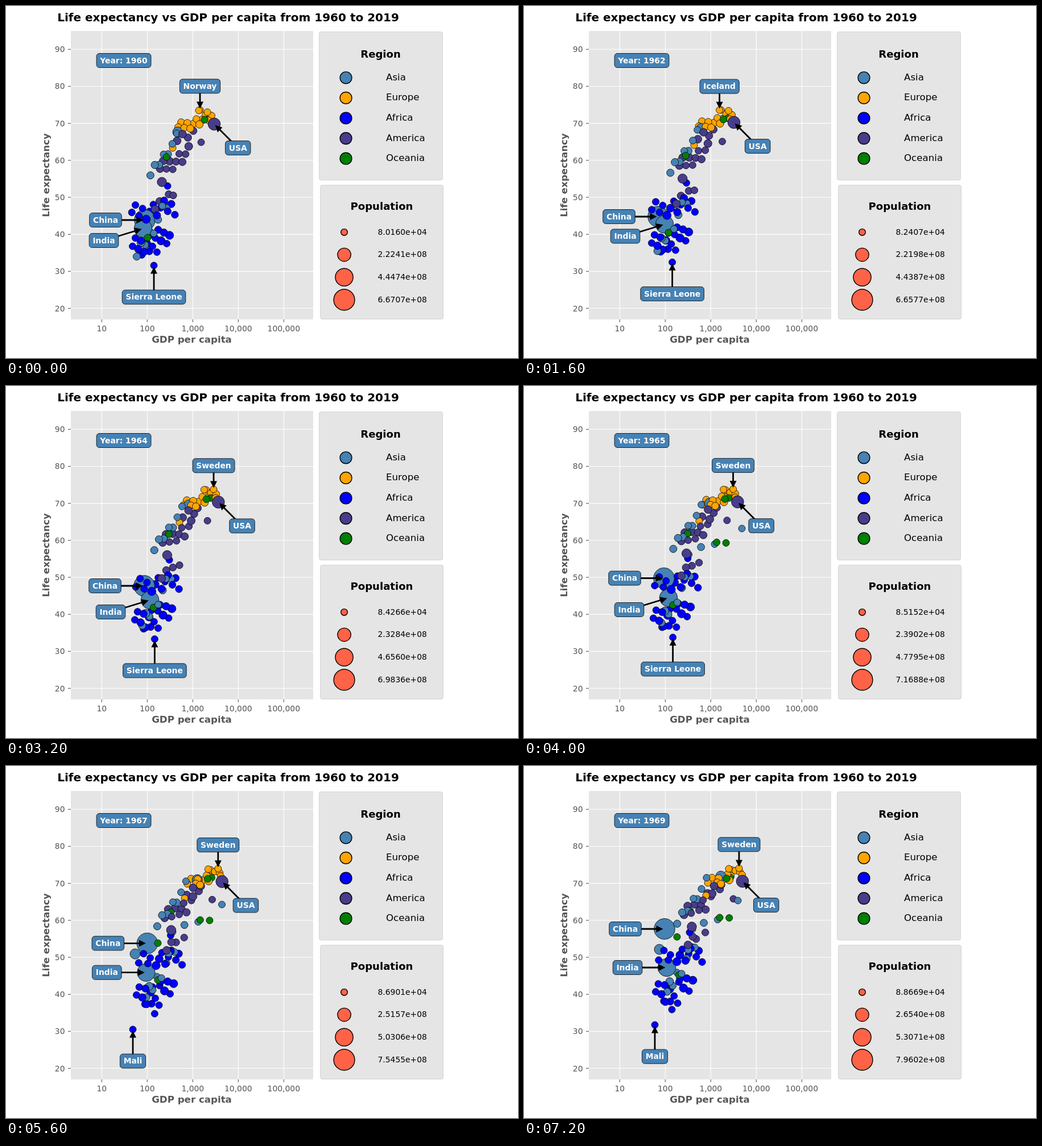
An HTML page for the animation above (8000 ms loop, 900 px wide and 620 px high).

```html
<!DOCTYPE html>
<html lang="en">
<head>
<meta charset="utf-8">
<title>Life expectancy vs GDP per capita</title>
<style>
  html, body { margin: 0; width: 100%; height: 100%; overflow: hidden; background: #fff; }
  svg { display: block; font-family: "DejaVu Sans", sans-serif; }
  .bold { font-weight: bold; }
  .mid { text-anchor: middle; }
  .end { text-anchor: end; }
  .axis { fill: #555; }
  .dot { stroke: #000; stroke-width: .8; }
  .key { stroke: #000; stroke-width: 1.4; }
  .panel { fill: #e5e5e5; stroke: #ccc; stroke-width: .8; }
  .grid { stroke: #fff; stroke-width: 1.1; }
  .tick { stroke: #555; stroke-width: 1.1; }
  .tag { fill: #4682b4; stroke: #000; stroke-width: .8; }
  .shaft { stroke: #000; stroke-width: 2.8; }
</style>
</head>
<body>
<svg id="stage" width="900" height="620" viewBox="0 0 900 620">
  <rect x="114" y="44" width="426" height="508" fill="#e5e5e5"/>
  <g id="base"></g>
  <g id="dots"></g>
  <g id="tags"></g>
</svg>
<script>
const STEP = 800, YEARS = 10, START = 1960;
const [base, dots, tags] = ['base', 'dots', 'tags'].map(id => document.getElementById(id));

function add(parent, name, attrs, text) {
  const el = document.createElementNS('http://www.w3.org/2000/svg', name);
  for (const k in attrs) el.setAttribute(k, attrs[k]);
  if (text != null) el.textContent = text;
  return parent.appendChild(el);
}
const label = (g, x, y, size, cls, text) =>
  add(g, 'text', { x, y, 'font-size': size, class: cls }, text);
const line = (g, x1, y1, x2, y2, cls) => add(g, 'line', { x1, y1, x2, y2, class: cls });
const circle = (g, cx, cy, r, fill, cls) => add(g, 'circle', { cx, cy, r, fill, class: cls });

const color = { Asia: '#4682b4', Europe: '#ffa500', Africa: '#0000ff', America: '#483d8b', Oceania: '#008000' };

const mix = (a, b, u) => a + (b - a) * u;

// Linear interpolation through keys of the form [year, a, b].
function along(keys, year) {
  let i = 1;
  while (i < keys.length - 1 && keys[i][0] < year) i++;
  const [from, to] = [keys[i - 1], keys[i]];
  const u = (year - from[0]) / (to[0] - from[0]);
  return [mix(from[1], to[1], u), mix(from[2], to[2], u)];
}

let seed = 7;
function random() {
  seed = (seed * 16807) % 2147483647;
  return seed / 2147483647;
}

const bodies = [];

// Rank sets the stacking order, from 0 at the back to 1 in front.
function country(region, r, keys, rank = random(), born = 0) {
  bodies.push({ fill: color[region], r, keys, rank, born });
  return keys;
}

// Spreads n countries evenly around a line; all drift roughly alike.
function cloud(region, n, [x0, y0], [x1, y1], spread, [dx, dy], born = 0) {
  for (let i = 0; i < n; i++) {
    const t = (i + .5) / n, side = (i * .618 + .5) % 1 * 2 - 1;
    const x = mix(x0, x1, t), y = mix(y0, y1, t) + side * spread;
    const pace = mix(.75, 1.25, random()), r = 6 + 1.3 * random() ** 3;
    country(region, r, [[0, x, y], [9, x + dx * pace, y + dy * pace]], random(), born);
  }
}

const china = country('Asia', 18.3, [[0, 244, 377], [2, 236, 371], [4, 243, 352], [6, 249, 325], [9, 247, 287]], .25);
const india = country('Asia', 15.8, [[0, 241, 392], [4, 253, 377], [5, 254, 373], [6, 244, 368], [9, 251, 355]], .45);
const usa = country('America', 10.8, [[0, 366, 208], [2, 369, 205], [9, 384, 203]], 1);
const norway = country('Europe', 6, [[0, 341, 183], [9, 365, 183]]);
const iceland = country('Europe', 6, [[0, 339, 184], [9, 360, 181]]);
const sweden = country('Europe', 6, [[0, 354, 187], [4, 365, 182], [9, 378, 180]], .95);
const sierraLeone = country('Africa', 6, [[0, 260, 457], [6, 262, 440], [9, 260, 429]]);
const mali = country('Africa', 6, [[7, 223, 464], [9, 230, 456]], .6, 7);

country('Asia', 9, [[0, 302, 222], [9, 346, 194]], .5);
country('Asia', 9, [[7, 227, 331], [9, 238, 323]], .4, 7);
country('Asia', 6, [[5, 383, 251], [9, 376, 237]], .5, 5);
cloud('Asia', 7, [250, 304], [304, 224], 9, [18, -24]);
cloud('Asia', 8, [226, 448], [286, 340], 14, [18, -36]);
cloud('Asia', 3, [270, 315], [340, 280], 6, [12, -18], 5);

country('Europe', 6, [[0, 293, 250], [9, 320, 228]]);
cloud('Europe', 12, [300, 214], [364, 196], 9, [22, -8]);

country('America', 6, [[0, 343, 240], [9, 368, 234]]);
country('America', 8.2, [[0, 274, 310], [9, 295, 283]]);
cloud('America', 5, [258, 362], [298, 322], 8, [22, -36]);
cloud('America', 10, [268, 288], [324, 258], 14, [12, -28]);
cloud('America', 4, [296, 240], [334, 220], 9, [20, -12]);

country('Africa', 6, [[0, 284, 317], [9, 291, 293]]);
cloud('Africa', 13, [218, 364], [300, 354], 16, [18, -25]);
cloud('Africa', 14, [220, 424], [290, 402], 17, [8, -23]);
cloud('Africa', 3, [232, 440], [272, 430], 4, [6, -20]);

country('Oceania', 6, [[0, 249, 408], [9, 272, 368]], .7);
country('Oceania', 6, [[0, 282, 266], [9, 292, 255]], .4);
country('Oceania', 6, [[7, 267, 312], [9, 269, 301]], .9, 7);
cloud('Oceania', 2, [345, 201], [361, 198], 1, [7, -2]);
cloud('Oceania', 2, [324, 283], [356, 294], 5, [16, -25], 5);

bodies.sort((a, b) => a.rank - b.rank);

// Smallest (in 1e4) and largest (in 1e8) population.
const population = [
  [0, 8.016, 6.6707], [1, 8.13, 6.6033], [2, 8.2407, 6.6577], [4, 8.4266, 6.9836],
  [6, 8.6038, 7.354], [7, 8.6901, 7.5455], [8, 8.7776, 7.7451], [9, 8.8669, 7.9602]
];

function drawBase() {
  label(base, 390.5, 27, 20, 'bold mid', 'Life expectancy vs GDP per capita from 1960 to 2019');
  ['10', '100', '1,000', '10,000', '100,000'].forEach((t, i) => {
    const x = 168.3 + 80 * i;
    line(base, x, 44, x, 552, 'grid');
    line(base, x, 552, x, 557, 'tick');
    label(base, x, 573, 13.89, 'axis mid', t);
  });
  for (let v = 20; v <= 90; v += 10) {
    const y = 532.5 - (v - 20) * 6.517;
    line(base, 114, y, 540, y, 'grid');
    line(base, 109, y, 114, y, 'tick');
    label(base, 103.5, y + 5, 13.89, 'axis end', v);
  }
  label(base, 326.5, 593, 16.67, 'axis bold mid', 'GDP per capita');
  label(base, 0, 0, 16.67, 'axis bold mid', 'Life expectancy')
    .setAttribute('transform', 'translate(75.5 298) rotate(-90)');

  add(base, 'rect', { x: 550.5, y: 45.5, width: 217, height: 261, rx: 3, class: 'panel' });
  add(base, 'rect', { x: 552.5, y: 315.5, width: 216, height: 236, rx: 3, class: 'panel' });
  label(base, 658.5, 91, 18.06, 'bold mid', 'Region');
  label(base, 660.5, 359, 18.06, 'bold mid', 'Population');
  Object.keys(color).forEach((name, i) => {
    const y = 126.3 + 35.6 * i;
    circle(base, 597.5, y, 10.4, color[name], 'key');
    label(base, 668, y + 4.5, 16.67, '', name);
  });
  [5.8, 11.7, 15.6, 18.5].forEach((r, i) => circle(base, 594.5, 398.4 + 39.7 * i, r, '#ff6347', 'key'));
}
drawBase();
const popLabels = [0, 1, 2, 3].map(i => label(base, 653.5, 402.8 + 39.6 * i, 13.89, '', ''));

function tag(text, x, y) {
  const box = add(tags, 'rect', { y: y - 12.5, height: 25, rx: 5, class: 'tag' });
  const name = label(tags, x, y + 4.6, 13.89, 'bold mid', text);
  const w = name.getComputedTextLength() + 12.5;
  name.setAttribute('fill', '#fff');
  box.setAttribute('x', x - w / 2);
  box.setAttribute('width', w);
}

function callout(text, [x, y], dx, dy) {
  const d = Math.hypot(dx, dy), deg = Math.atan2(dy, dx) * 180 / Math.PI;
  const g = add(tags, 'g', { transform: `translate(${x} ${y}) rotate(${deg})` });
  line(g, 12, 0, d, 0, 'shaft');
  add(g, 'path', { d: 'M2.5 0L14.5 -6V6Z' });
  tag(text, x + dx, y + dy);
}

function leader(year) {
  if (year < 2) return ['Norway', norway];
  return year === 2 || year === 8 ? ['Iceland', iceland] : ['Sweden', sweden];
}

function draw(year) {
  dots.replaceChildren();
  tags.replaceChildren();
  for (const { keys, r, fill, born } of bodies)
    if (year >= born) circle(dots, ...along(keys, year), r, fill, 'dot');

  tag('Year: ' + (START + year), 207, 96);
  const [top, topKeys] = leader(year);
  callout(top, along(topKeys, year), 0, -41.7);
  callout('USA', along(usa, year), 41.7, 42);
  callout('China', along(china, year), -69, 0);
  callout('India', along(india, year), -69, year < 6 ? 21 : 0);
  const [low, lowKeys] = year < 7 ? ['Sierra Leone', sierraLeone] : ['Mali', mali];
  callout(low, along(lowKeys, year), 0, 55.7);

  const [min, max] = along(population, year);
  popLabels.forEach((el, i) => {
    el.textContent = mix(min * 1e4, max * 1e8, i / 3).toExponential(4).replace('+', '+0');
  });
}

let shown = -1;
const t0 = performance.now();
function tick() {
  const year = Math.floor((performance.now() - t0) / STEP) % YEARS;
  if (year !== shown) draw(shown = year);
  requestAnimationFrame(tick);
}
tick();
</script>
</body>
</html>
```
